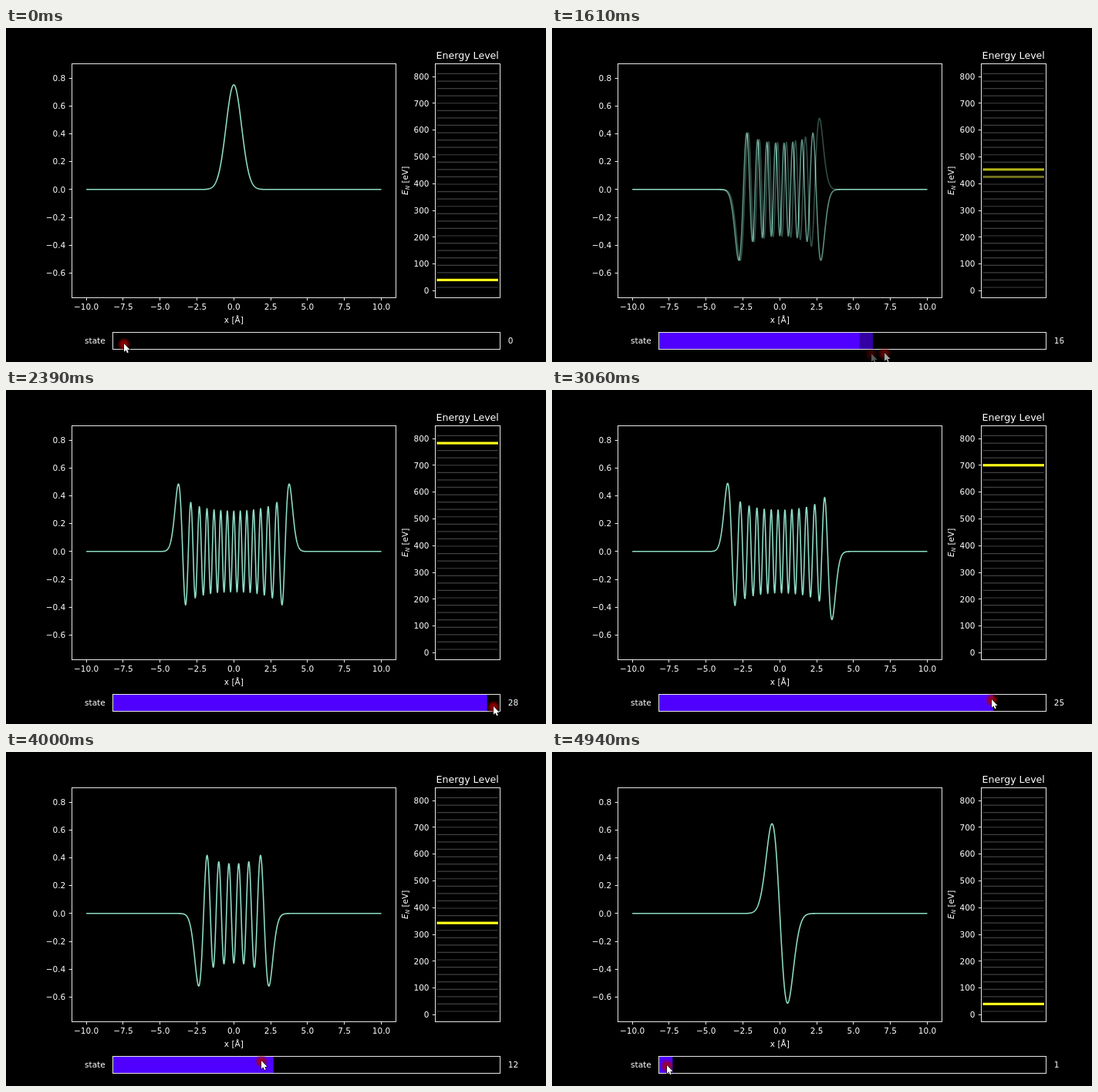
These frames come from a looping animation (700x434 px, 4.99 s). An HTML page with a canvas:

```html
<!DOCTYPE html>
<html lang="en">
<head>
<meta charset="utf-8">
<title>Oscillator eigenstates</title>
<style>
html, body { margin: 0; width: 100%; height: 100%; overflow: hidden; background: #000; }
svg, canvas { position: absolute; left: 0; top: 0; width: 700px; height: 434px; }
text { font: 10.5px "DejaVu Sans", sans-serif; fill: #fff; }
.title { font-size: 12.6px; }
.line { fill: none; stroke: #fff; stroke-width: .9; }
.level { stroke: #404040; stroke-width: 1.2; }
</style>
</head>
<body>
<svg id="chart" viewBox="0 0 700 434">
  <rect class="line" x="85.5" y="46.5" width="420" height="304"/>
  <rect class="line" x="556.5" y="46.5" width="84" height="304"/>
  <rect class="line" x="138.5" y="395.5" width="502" height="22"/>
  <text class="title" x="598.2" y="39.7" text-anchor="middle">Energy Level</text>
  <text x="295.3" y="383" text-anchor="middle">x [Å]</text>
  <text x="128.7" y="410" text-anchor="end">state</text>
  <text transform="translate(520.8 198.3) rotate(-90)" text-anchor="middle"><tspan font-style="italic">E</tspan><tspan font-style="italic" font-size="7.35" dy="1.7">N</tspan><tspan dy="-1.7"> [eV]</tspan></text>
</svg>
<canvas id="view" width="700" height="434"></canvas>
<script>
const LOOP = 4990, FRAME = 1000 / 18;
const X0 = 295.3, XS = 19.12, Y0 = 209.8, YS = 181, ALPHA = 1.9;
const SLIDER = 138.5, STEP = 502 / 29;
const FLIPPED = [4, 6, 9, 12, 15, 16, 19, 22, 27];

// frame, level, pointer x, pointer y
const KEYS = [
  [0, 1, 153, 410], [6, 1, 153, 410], [12, 1.5, 168, 409], [16, 3.05, 200, 411],
  [19, 6.09, 262, 413], [20, 7.1, 293, 417], [28, 15.19, 414, 423], [29, 16.2, 431, 422],
  [42, 28.04, 618, 412], [43, 28.95, 632, 411], [44, 29.4, 638, 412], [47, 29.3, 640, 416],
  [49, 29, 634, 413], [55, 25.2, 570, 402], [72, 12.1, 331, 401], [75, 8.2, 263, 404],
  [85, 2.1, 161, 408], [87, 1.3, 152, 407], [89, 1, 149, 407]
];

const levelY = n => 337 - 9.57 * n;

// Static axes
const chart = document.getElementById('chart');
function add(tag, attrs, label = '') {
  const el = document.createElementNS(chart.namespaceURI, tag);
  for (const name in attrs) el.setAttribute(name, attrs[name]);
  el.textContent = label;
  chart.append(el);
}
const snap = v => Math.floor(v) + .5;
const signed = (v, digits) => v.toFixed(digits).replace('-', '\u2212');
function yTick(axisX, y, label) {
  add('path', { class: 'line', d: `M${axisX} ${snap(y)}h-3.7` });
  add('text', { x: axisX - 8, y: y + 3.8, 'text-anchor': 'end' }, label);
}
for (let i = -4; i <= 4; i++) {
  const x = X0 + i * 2.5 * XS;
  add('path', { class: 'line', d: `M${snap(x)} 350.5v3.7` });
  add('text', { x, y: 366.4, 'text-anchor': 'middle' }, signed(i * 2.5, 1));
}
for (let i = -3; i <= 4; i++) yTick(85.3, Y0 - i * .2 * YS, signed(i * .2, 1));
for (let i = 0; i <= 8; i++) yTick(556.5, 341.4 - i * 34.8, i * 100);
for (let n = 0; n < 30; n++) add('path', { class: 'level', d: `M559 ${levelY(n)}H637.5` });

// Harmonic oscillator wave functions
function psi(n, q) {
  let prev = 0, cur = Math.PI ** -.25 * Math.exp(-q * q / 2);
  for (let k = 0; k < n; k++)
    [prev, cur] = [cur, Math.sqrt(2 / (k + 1)) * q * cur - Math.sqrt(k / (k + 1)) * prev];
  return cur;
}
const curves = Array.from({ length: 30 }, (_, n) => {
  const sign = (n % 2 ? -1 : 1) * (FLIPPED.includes(n) ? -1 : 1);
  const path = new Path2D();
  for (let i = 0; i <= 1000; i++) {
    const x = -10 + i / 50;
    path.lineTo(X0 + x * XS, Y0 - sign * psi(n, ALPHA * x) * YS);
  }
  return path;
});

const ctx = document.getElementById('view').getContext('2d');
const layer = document.createElement('canvas');
layer.width = 700;
layer.height = 434;
const g = layer.getContext('2d');
const arrow = new Path2D('M0 0V10.8L2.5 8.6 4.1 12.2 5.8 11.5 4.3 8H7.6Z');

function pose(k) {
  const i = Math.max(1, KEYS.findIndex(key => key[0] >= k));
  const a = KEYS[i - 1], b = KEYS[i], p = (k - a[0]) / (b[0] - a[0]);
  const [, level, x, y] = a.map((v, j) => v + (b[j] - v) * p);
  return { n: k ? Math.floor(level + 1e-6) : 0, x, y };
}

function drawPose({ n, x, y }) {
  g.clearRect(0, 0, 700, 434);
  g.lineJoin = 'round';
  g.strokeStyle = '#8edcc6';
  g.lineWidth = 1.58;
  g.stroke(curves[n]);

  g.fillStyle = '#ffff1a';
  g.fillRect(558.5, levelY(Math.max(n, 1)) - 1.6, 79.5, 3.2);
  g.fillStyle = '#5000ff';
  g.fillRect(139, 396, n * STEP, 21);
  g.fillStyle = '#fff';
  g.font = '10.5px "DejaVu Sans", sans-serif';
  g.fillText(n, 650.7, 410);

  g.save();
  g.translate(x, y);
  const glow = g.createRadialGradient(0, 1, 0, 0, 1, 9);
  glow.addColorStop(0, 'rgba(190,0,0,.9)');
  glow.addColorStop(.5, 'rgba(170,0,0,.7)');
  glow.addColorStop(1, 'rgba(150,0,0,0)');
  g.fillStyle = glow;
  g.fillRect(-9, -8, 18, 18);
  g.strokeStyle = '#000';
  g.lineWidth = 1.2;
  g.stroke(arrow);
  g.fillStyle = '#fff';
  g.fill(arrow);
  g.restore();
}

function blend(p, weight) {
  drawPose(p);
  ctx.globalAlpha = weight;
  ctx.drawImage(layer, 0, 0);
}

let shown = -1;
function tick() {
  const t = Math.floor(performance.now() % LOOP / 10) * 10;
  const k = Math.min(89, Math.floor((t + 5) / FRAME));
  if (k !== shown) {
    shown = k;
    const now = pose(k), before = pose(Math.max(0, k - 1));
    const ghost = k > 1 && before.n !== now.n ? .35 : 0;
    ctx.globalCompositeOperation = 'lighter';
    ctx.clearRect(0, 0, 700, 434);
    if (ghost) blend(before, ghost);
    blend(now, 1 - ghost);
  }
  requestAnimationFrame(tick);
}
tick();
</script>
</body>
</html>
```
